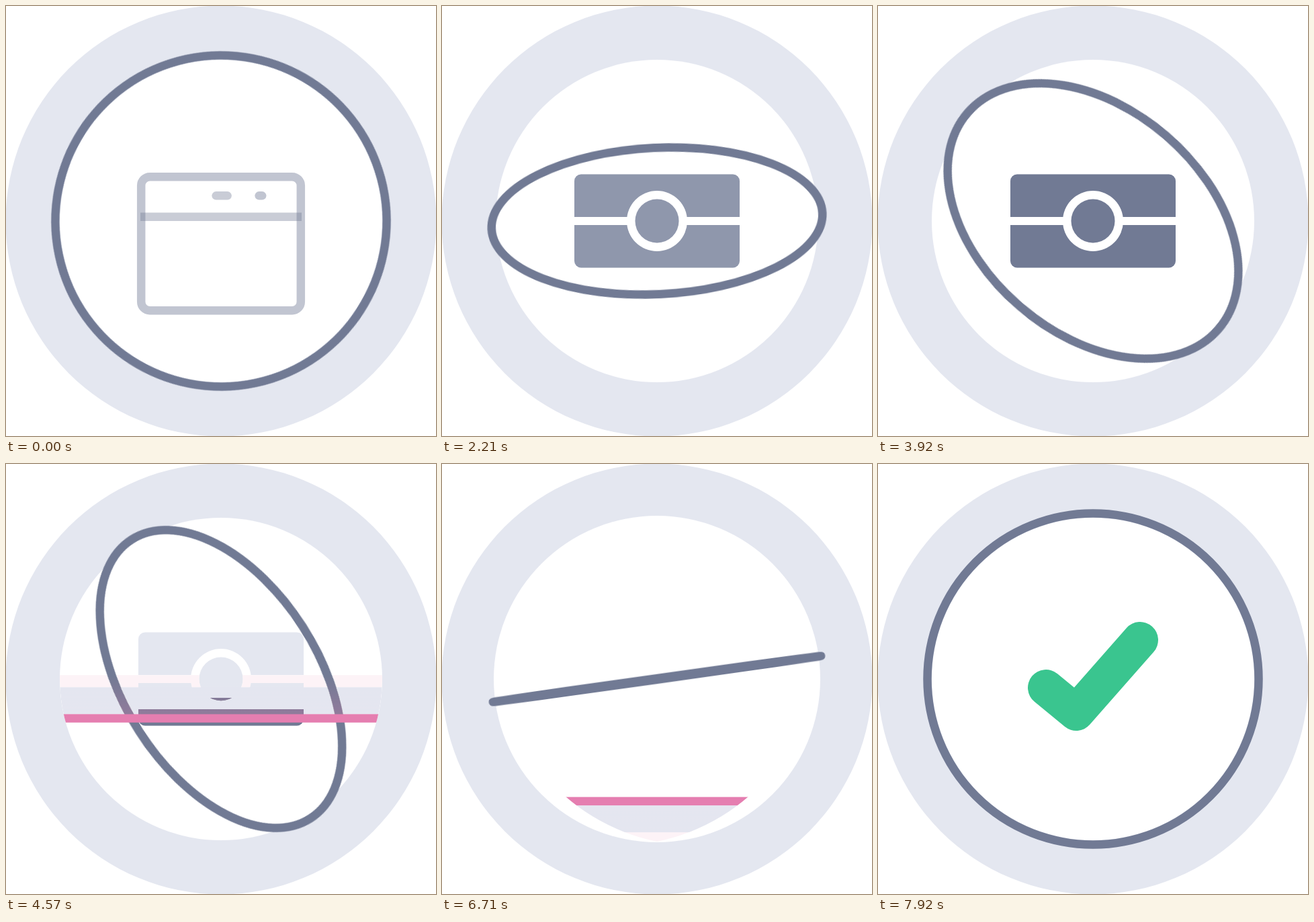
An HTML page without scripts for the animation above (8000 ms loop, 640x640 px).

```html
<!DOCTYPE html>
<html lang="en">
<head>
<meta charset="utf-8">
<title>Scan loader</title>
<style>
  @property --tilt { syntax: "<angle>"; inherits: true; initial-value: 0deg; }
  @property --turn { syntax: "<angle>"; inherits: true; initial-value: 0deg; }
  @property --wide { syntax: "<length>"; inherits: true; initial-value: 246.5px; }
  @property --down { syntax: "<length>"; inherits: true; initial-value: -100px; }
  @property --up { syntax: "<length>"; inherits: true; initial-value: 700px; }

  html, body { margin: 0; width: 100%; height: 100%; overflow: hidden; background: #fff; }
  svg {
    --pale: #e4e7f0;
    --slate: #717a94;
    --pink: #e57eb0;
    display: block; width: 100%; height: 100%;
    animation: scan-down 8s linear infinite, scan-up 8s linear infinite;
  }
  .pale { fill: var(--pale); }
  .slate { fill: var(--slate); }
  .white { fill: #fff; }
  .move { transform-origin: 320px 320px; animation: 8s linear infinite; }

  /* The ring is a disc tilted in depth, with an even stroke */
  .ring {
    fill: none; stroke: var(--slate); stroke-width: 12.5; stroke-linejoin: round;
    rx: var(--wide);
    ry: max(246.5px * cos(var(--tilt)), -246.5px * cos(var(--tilt)), 1px);
    transform: rotate(var(--turn));
    animation-name: tilt, turn, stretch;
  }
  @keyframes tilt {
    0%, 9.75% { --tilt: 0deg; }
    18.75% { --tilt: 136deg; }
    21.75% { --tilt: 180deg; }
    38.375% { --tilt: 360deg; }
    57.125% { --tilt: 594deg; }
    74% { --tilt: 737.6deg; }
    83.875% { --tilt: 810deg; }
    90%, 100% { --tilt: 900deg; }
  }
  @keyframes turn {
    0%, 9.75% { --turn: -60deg; }
    18.75% { --turn: -20.9deg; }
    57.125% { --turn: 57.3deg; }
    74% { --turn: 105deg; }
    83.875% { --turn: 172deg; }
    90%, 100% { --turn: 180deg; }
  }
  @keyframes stretch {
    0%, 84% { --wide: 246.5px; }
    88% { --wide: 255.5px; }
    93%, 100% { --wide: 246.5px; }
  }

  .hole { animation-name: hole; }
  @keyframes hole {
    0%, 75% { r: 240px; }
    75.01%, 95% { r: 243px; }
    95.01%, 100% { r: 240px; }
  }

  /* Scan lines */
  @keyframes scan-down {
    0%, 49.68% { --down: -100px; }
    49.69% { --down: 67px; }
    63.18% { --down: 620px; }
    63.19%, 100% { --down: 700px; }
  }
  @keyframes scan-up {
    0%, 82.26% { --up: 700px; }
    82.27% { --up: 562px; }
    96.21% { --up: -10px; }
    96.22%, 100% { --up: -100px; }
  }
  .scan rect { x: 60px; width: 520px; }
  .scan .line { height: 12.5px; fill: var(--pink); }
  .scan .near { height: 40px; fill: #e4e6f0; mix-blend-mode: darken; }
  .scan .far { height: 18px; fill: #fdf3f7; mix-blend-mode: darken; }
  .scan .glow { height: 58px; mix-blend-mode: lighten; }
  .falling .line { y: var(--down); }
  .falling .near { y: calc(var(--down) - 40px); }
  .falling .far, .falling .glow { y: calc(var(--down) - 58px); }
  .rising .line { y: var(--up); }
  .rising .near, .rising .glow { y: calc(var(--up) + 12.5px); }
  .rising .far { y: calc(var(--up) + 50.5px); }
  .cut-card { y: calc(var(--down) - 7px); }
  .cut-coin { y: calc(var(--down) - 24px); }

  /* Icons */
  .window { fill: none; stroke: var(--slate); stroke-width: 12.5; }
  .window > * { animation: window 8s linear infinite; }
  .window .thin { --first: .38; }
  @keyframes window {
    0%, .87% { opacity: var(--first, .43); }
    6.25%, 9.75% { opacity: 1; }
    14%, 100% { opacity: 0; }
  }
  .note { animation-name: note; }
  @keyframes note {
    0%, 14% { opacity: 0; transform: none; }
    18%, 32% { opacity: 1; transform: none; }
    36%, 41% { opacity: 1; transform: scale(1.065); }
    46%, 66% { opacity: 1; transform: none; }
    70%, 100% { opacity: 0; transform: none; }
  }
  .dark { animation-name: dark; }
  @keyframes dark {
    0%, 21% { opacity: 0; }
    30%, 100% { opacity: 1; }
  }
  .dot { transform-origin: 260px 288.5px; animation-name: dot; }
  @keyframes dot {
    0%, 72% { transform: scale(0); }
    74%, 76% { transform: scale(1); }
    79%, 100% { transform: scale(0); }
  }
  .check {
    fill: none; stroke: #3ac58f; stroke-width: 54;
    stroke-linecap: round; stroke-linejoin: round;
    animation-name: check;
  }
  @keyframes check {
    0%, 92.5% { transform: scale(0); animation-timing-function: ease-out; }
    96% { transform: scale(1.07); animation-timing-function: ease-in-out; }
    98%, 100% { transform: none; }
  }
</style>
</head>
<body>
<svg viewBox="0 0 640 640">
  <defs>
    <clipPath id="disc"><circle cx="320" cy="320" r="240"/></clipPath>
    <clipPath id="lens" clip-path="url(#hole)">
      <path d="M320 562A300 300 0 0 1 80 268V0H560V268A300 300 0 0 1 320 562Z"/>
    </clipPath>
    <clipPath id="hole"><circle cx="320" cy="320" r="243"/></clipPath>
    <clipPath id="cutCard"><rect class="cut-card" width="640" height="800"/></clipPath>
    <clipPath id="cutCoin"><rect class="cut-coin" width="640" height="800"/></clipPath>
    <linearGradient id="fadeUp" x1="0" y1="0" x2="0" y2="1">
      <stop offset="0" stop-color="#e87fb0" stop-opacity="0"/>
      <stop offset="1" stop-color="#e87fb0" stop-opacity=".27"/>
    </linearGradient>
    <linearGradient id="fadeDown" href="#fadeUp" x1="0" y1="1" x2="0" y2="0"/>
  </defs>

  <rect class="white" width="640" height="640"/>
  <circle class="pale" cx="320" cy="320" r="320.5"/>
  <circle class="white hole move" cx="320" cy="320" r="240"/>

  <g class="window">
    <rect x="201.2" y="254.2" width="237.6" height="199" rx="13"/>
    <path class="thin" d="M200 313.7H440"/>
    <path class="thin" d="M312.6 282.3H329.6" stroke-linecap="round"/>
    <path d="M376.6 282.3H381.2" stroke-linecap="round"/>
  </g>

  <g class="note move">
    <rect class="pale" x="197" y="250.5" width="246" height="139" rx="10"/>
    <g class="dark move">
      <rect class="slate" x="197" y="250.5" width="246" height="139" rx="10" clip-path="url(#cutCard)"/>
    </g>
    <rect class="white" x="197" y="314" width="247" height="12"/>
    <circle class="white" cx="320" cy="320" r="45"/>
    <circle class="pale" cx="320" cy="320" r="32.5"/>
    <g class="dark move">
      <circle class="slate" cx="320" cy="320" r="32.5" clip-path="url(#cutCoin)"/>
    </g>
  </g>

  <circle class="pale dot move" cx="260" cy="288.5" r="19.3"/>
  <path class="check move" d="M250 333L295 370L390 262"/>

  <ellipse class="ring move" cx="320" cy="320" rx="246.5" ry="246.5"/>

  <g class="scan falling">
    <rect class="far" clip-path="url(#disc)"/>
    <rect class="near" clip-path="url(#disc)"/>
    <rect class="glow" fill="url(#fadeUp)" clip-path="url(#disc)"/>
    <rect class="line" clip-path="url(#disc)"/>
  </g>
  <g class="scan rising">
    <rect class="far" clip-path="url(#lens)"/>
    <rect class="near" clip-path="url(#lens)"/>
    <rect class="glow" fill="url(#fadeDown)" clip-path="url(#lens)"/>
    <rect class="line" clip-path="url(#lens)"/>
  </g>
</svg>
</body>
</html>
```
